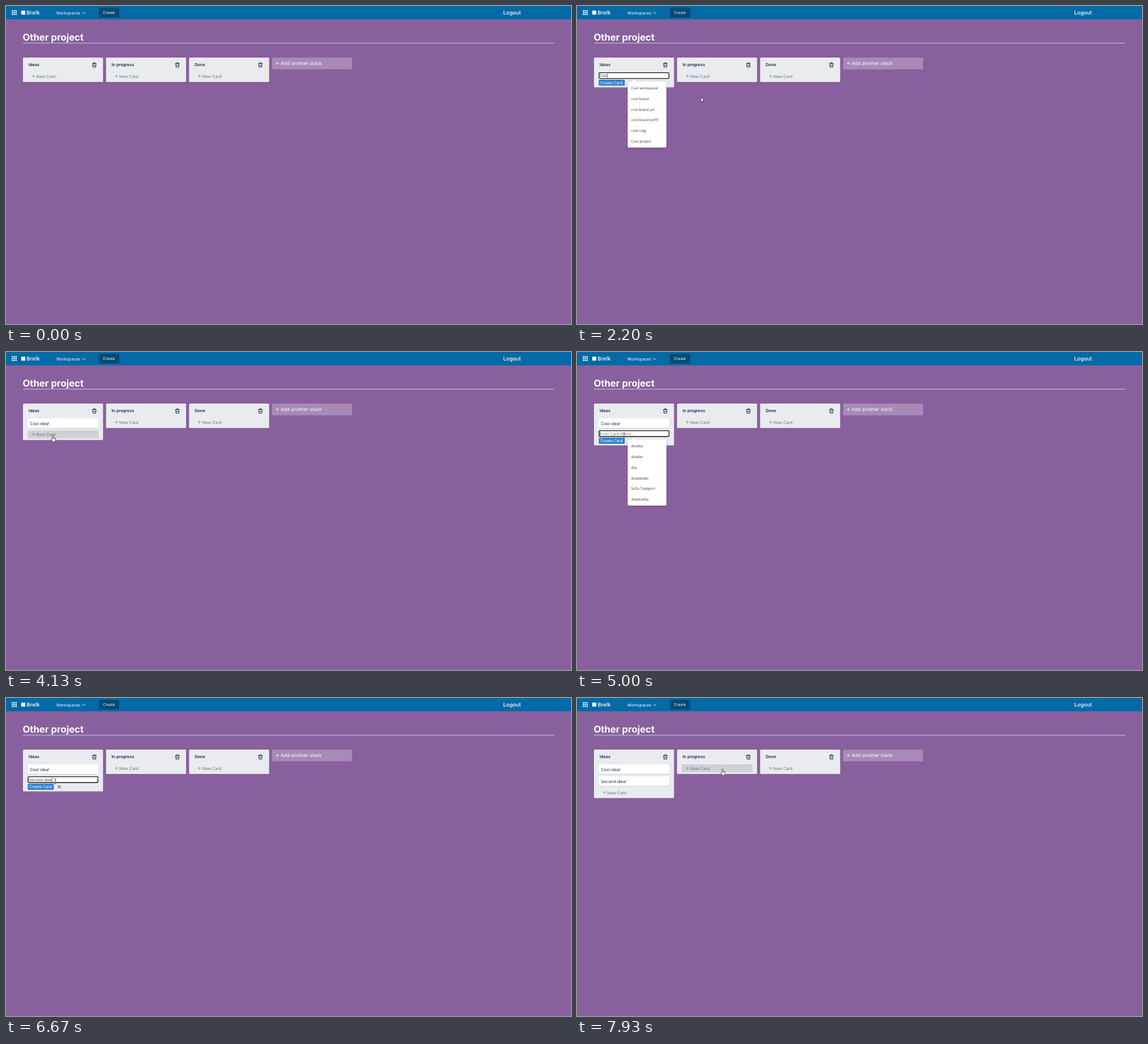
Animation of 998 by 561 pixels, one loop 8 s. Source, as an HTML page with a canvas:

```html
<!DOCTYPE html>
<html lang="en">
<head>
<meta charset="utf-8">
<title>Task board</title>
<style>
html, body { margin: 0; width: 100%; height: 100%; overflow: hidden; background: #89609e; }
canvas { display: block; }
</style>
</head>
<body>
<canvas id="stage" width="998" height="561"></canvas>
<script>
const ctx = document.getElementById('stage').getContext('2d');
const LOOP = 8000, PITCH = 21.3;
const NAVY = '#172b4d', GRAY = '#74767e', WHITE = '#fff';

// Each entry: when its input opens, gets the black focus ring, is submitted, and its key presses.
const entries = [
  { text: 'Cool idea!', open: 800, focus: 1130, done: 3630,
    keys: [1930, 2030, 2130, 2270, 2400, 2730, 2800, 2870, 2930, 3130] },
  { text: 'Second idea!', open: 4530, focus: 4830, done: 7050,
    keys: [5470, 5550, 5640, 5740, 5840, 5930, 6000, 6200, 6270, 6370, 6470, 6700] }
];
const history = ['dsadsa', 'dsadas', 'dsa', 'dsadasdas', 'Sofia Tradgorn', 'dsadsadsa',
  'Cool workspace!', 'cool board', 'cool board yo!', 'cool board yo!!!!!', 'cool crag',
  'Cool project', 'Second card'];

// Pointer stops: time, x, y
const stops = [[130, 786, 182], [650, 102, 125], [1170, 102, 125], [1560, 219, 161],
  [3130, 219, 161], [3480, 64, 135], [3700, 64, 135], [4130, 83, 147], [5470, 83, 147],
  [5600, 87, 147], [6740, 87, 147], [6960, 64, 156], [7110, 64, 156], [7450, 207, 185],
  [7530, 207, 185], [7830, 257, 125]];

const arrow = new Path2D('M0 0V8.2L1.9 6.5 3.2 9.3 4.3 8.8 3.1 6.1H5.6Z');
const hand = new Path2D('M-1 .8C-1-.3 .8-.3 .8.8V4L4 5Q4.6 5.2 4.5 6V8.5L3.6 11.2H-.5L-3 7.6Q-3 6-1 7Z');
const beam = new Path2D('M-2-4.2H-.6L0-3.7 .6-4.2H2M0-3.7V3.7M-2 4.2H-.6L0 3.7 .6 4.2H2');
const trash = new Path2D('M0 2H8M2.6 2V.5H5.4V2M1 2L1.5 8.5H6.5L7 2M3 4V6.7M5 4V6.7');

function box(x, y, w, h, fill, radius = 1.5) {
  ctx.fillStyle = fill;
  ctx.beginPath();
  ctx.roundRect(x, y, w, h, radius);
  ctx.fill();
}

function line(path, x, y, color, width) {
  ctx.save();
  ctx.translate(x, y);
  ctx.strokeStyle = color;
  ctx.lineWidth = width;
  ctx.stroke(path instanceof Path2D ? path : new Path2D(path));
  ctx.restore();
}

// y is the middle of the capitals
function label(text, x, y, size, color, weight = 400, family = 'Inter') {
  ctx.font = `${weight} ${size}px "${family}", sans-serif`;
  ctx.fillStyle = color;
  ctx.fillText(text, x, y + size * 0.36);
  return ctx.measureText(text).width;
}

function withShadow(color, blur, dy, draw) {
  ctx.save();
  ctx.shadowColor = color;
  ctx.shadowBlur = blur;
  ctx.shadowOffsetY = dy;
  draw();
  ctx.restore();
}

function pointerAt(t) {
  const i = stops.findIndex(s => s[0] > t);
  if (i === 0) return null;
  if (i < 0) return stops.at(-1).slice(1);
  const [a, b] = [stops[i - 1], stops[i]];
  const p = (t - a[0]) / (b[0] - a[0]);
  const ease = p * p * (3 - 2 * p);
  return [a[1] + (b[1] - a[1]) * ease, a[2] + (b[2] - a[2]) * ease];
}

function inside(p, x, y, w, h) {
  return p && p[0] >= x && p[0] <= x + w && p[1] >= y && p[1] <= y + h;
}

function drawHeader() {
  box(0, 0, 998, 23.5, '#026aa7', 0);
  for (let i = 0; i < 9; i++) box(10.3 + i % 3 * 3.2, 7.3 + Math.floor(i / 3) * 3.2, 2.2, 2.2, WHITE, 0.3);
  box(27, 8.2, 7, 7, WHITE, 0);
  label('Brelk', 36.3, 11.9, 9.36, WHITE, 600, 'Open Sans');
  label('Workspaces', 88.8, 12, 7.28, WHITE);
  line('M0 0L2.9 2.9 5.8 0', 134.4, 10.7, WHITE, 0.9);
  box(164, 3, 36, 17.2, '#014a75');
  label('Create', 171.2, 11.8, 6.76, WHITE);
  label('Logout', 878.2, 11.9, 9.36, WHITE, 500);
  label('Other project', 29.4, 55, 16.7, WHITE, 700);
  box(30, 65, 938, 0.8, 'rgba(255,255,255,.85)', 0);
  box(470, 91, 141.3, 20.8, 'rgba(255,255,255,.26)');
  line('M0 3H5.6M2.8 .2V5.8', 476.4, 98.3, WHITE, 0.8);
  label('Add another stack', 485, 101.4, 8.42, WHITE);
}

function drawNewCard(x, y, pointer) {
  const hover = inside(pointer, x + 8.3, y, 125, 14);
  if (hover) box(x + 8.3, y, 125, 14, '#cfd0d4');
  line('M0 2.5H5M2.5 0V5', x + 16, y + 4.3, GRAY, 0.7);
  label('New Card', x + 23.3, y + 7.3, 7.28, GRAY);
  return hover ? 'hand' : null;
}

function drawForm(entry, y, t, pointer) {
  const typed = entry.text.slice(0, entry.keys.filter(k => k <= t).length);
  const focused = t >= entry.focus;
  box(38.3, y, 124.8, 11.6, focused ? '#101010' : '#2b72b8', 1.8);
  box(39.6, y + 1.3, 122.2, 9, WHITE, 0.6);
  const width = label(typed || 'Enter Card Name...', 39.9, y + 6, 6.93, typed ? '#444' : '#858585');
  if (focused) box(40.1 + (typed ? width : 0), y + 1.9, 0.6, 7.9, '#222', 0);
  box(38.4, y + 13, 46, 10.6, '#2f7fd0');
  label('Create Card', 41, y + 18.4, 7, WHITE);
  line('M0 0L5.4 5.4M5.4 0L0 5.4', 91.5, y + 15.5, '#111', 1);
  if (focused) drawSuggestions(typed, y + 16);
  if (inside(pointer, 38.4, y + 13, 46, 10.6)) return 'hand';
  return inside(pointer, 38.3, y, 124.8, 12) ? 'beam' : null;
}

function drawSuggestions(prefix, y) {
  const items = history.filter(s => s.toLowerCase().startsWith(prefix.toLowerCase())).slice(0, 6);
  if (!items.length) return;
  const width = items.length > 2 ? 68.5 : 63.5;
  withShadow('rgba(0,0,0,.35)', 2.5, 0.6, () => box(89.5, y, width, 4.6 + 18.7 * items.length, WHITE));
  ctx.fill(new Path2D(`M95.6 ${y + 0.5}l5-3.4 5 3.4z`));
  items.forEach((s, i) => label(s, 95.7, y + 11.9 + i * 18.7, 6.25, '#333', 400, 'Open Sans'));
}

function drawPointer(kind, p) {
  if (kind === 'beam') {
    line(beam, p[0], p[1], 'rgba(255,255,255,.7)', 1.6);
    line(beam, p[0], p[1], '#222', 0.8);
    return;
  }
  const shape = kind === 'hand' ? hand : arrow;
  ctx.save();
  ctx.translate(p[0], p[1]);
  ctx.fillStyle = WHITE;
  ctx.fill(shape);
  ctx.restore();
  line(shape, p[0], p[1], '#222', 0.7);
  if (kind === 'hand') line('M.8 4V6M2.1 4.6V6.3M3.3 5V6.5', p[0], p[1], '#222', 0.5);
}

function draw(t) {
  const pointer = pointerAt(t);
  const cards = entries.filter(e => e.done <= t);
  const active = entries.find(e => e.open <= t && t < e.done);
  let kind = null;

  box(0, 0, 998, 561, '#89609e', 0);
  drawHeader();
  ['Ideas', 'In progress', 'Done'].forEach((title, i) => {
    const x = 30 + i * 146.7;
    const first = i === 0;
    const shift = first ? cards.length * PITCH : 0;
    const editing = first && active;
    box(x, 91, 141.4, (editing ? 52.4 : 43) + shift, '#e9ebef');
    label(title, x + 9.9, 103.5, 7.28, NAVY, 600);
    line(trash, x + 122, 99.5, NAVY, 0.95);
    if (first) cards.forEach((card, n) => {
      const y = 117 + n * PITCH;
      withShadow('rgba(9,30,66,.3)', 0.8, 0.6, () => box(38.3, y, 124.8, 17.2, WHITE));
      label(card.text, 42.2, y + 8.9, 7.28, NAVY);
    });
    if (!editing) kind = drawNewCard(x, 117 + shift, pointer) || kind;
  });
  if (active) kind = drawForm(active, 117 + cards.length * PITCH, t, pointer);
  if (pointer) drawPointer(kind, pointer);
}

ctx.textRendering = 'geometricPrecision';
(function tick() {
  draw(performance.now() % LOOP);
  requestAnimationFrame(tick);
})();
</script>
</body>
</html>
```
